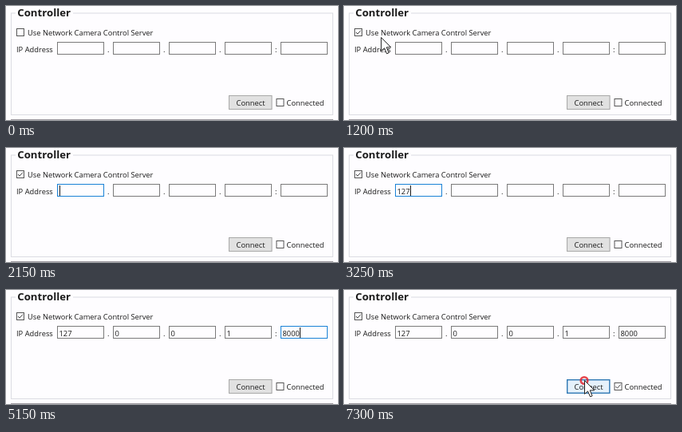
An HTML page with a canvas that plays this animation: 416 px wide and 143 px high, repeating every 7.35 s.

```html
<!DOCTYPE html>
<html lang="en">
<head>
<meta charset="utf-8">
<title>Controller</title>
<style>
  html, body { margin: 0; width: 100%; height: 100%; overflow: hidden; background: #fefdff; }
  canvas { display: block; width: 416px; height: 143px; }
</style>
</head>
<body>
<canvas id="stage"></canvas>
<script>
const WIDTH = 416, HEIGHT = 143, LOOP = 7350, STEP = 50;
const PAPER = '#fefdff', INK = '#1a1a1a';
const canvas = document.getElementById('stage');
const ctx = canvas.getContext('2d');
const ratio = window.devicePixelRatio || 1;
canvas.width = WIDTH * ratio;
canvas.height = HEIGHT * ratio;

const fieldX = [64, 134, 204, 274, 344];

// Each entry: time, field index, text from then on
const typing = [
  [2350, 0, '1'], [3100, 0, '12'], [3250, 0, '127'],
  [3750, 1, '0'], [4000, 2, '0'], [4350, 3, '1'],
  [4750, 4, '8'], [4850, 4, '80'], [5000, 4, '800'], [5150, 4, '8000']
];
const focusTimes = [[1650, 0], [3600, 1], [3850, 2], [4150, 3], [4550, 4], [6150, -1]];

// Pointer visits: time, x, y
const visits = [
  [[100, 35, 72], [400, 27, 9], [650, 20, 32], [850, 20, 33], [1000, 22, 34],
   [1450, 81, 47], [1650, 83, 48], [1750, 90, 52], [2150, 336, 146]],
  [[5750, 254, 144], [6100, 297, 122], [7250, 297, 122], [7300, 301.5, 113.5], [7350, 301.5, 113.5]]
];
const presses = [[700, 850], [1500, 1550], [6100, 6200], [7300, 7400]];

function pointerAt(t) {
  const path = visits.find(v => t >= v[0][0] && t <= v[v.length - 1][0]);
  if (!path) return null;
  const i = Math.max(1, path.findIndex(p => p[0] >= t));
  const [t0, x0, y0] = path[i - 1], [t1, x1, y1] = path[i];
  const u = (t - t0) / (t1 - t0), e = u * u * (3 - 2 * u);
  return { x: x0 + (x1 - x0) * e, y: y0 + (y1 - y0) * e };
}

function box(x, y, w, h, stroke, fill = PAPER, line = 1) {
  ctx.fillStyle = fill;
  ctx.fillRect(x, y, w, h);
  ctx.strokeStyle = stroke;
  ctx.lineWidth = line;
  ctx.strokeRect(x + line / 2, y + line / 2, w - line, h - line);
}

function text(s, x, y, font = '9.35px') {
  ctx.font = font + ' "Open Sans", "Noto Sans", sans-serif';
  ctx.fillStyle = INK;
  ctx.fillText(s, x, y);
}

function polyline(points, color, width) {
  ctx.beginPath();
  points.forEach(([x, y]) => ctx.lineTo(x, y));
  ctx.strokeStyle = color;
  ctx.lineWidth = width;
  ctx.stroke();
}

function checkbox(x, y, checked) {
  box(x, y, 10, 10, '#555');
  if (checked) polyline([[x + 2, y + 5], [x + 4, y + 7.2], [x + 8, y + 2.6]], '#444', 1);
}

function drawFields(t, pointer) {
  const focus = (focusTimes.filter(f => f[0] <= t).pop() || [0, -1])[1];
  fieldX.forEach((x, i) => {
    const hover = pointer && pointer.x > x && pointer.x < x + 59 && pointer.y > 45 && pointer.y < 61;
    const border = hover ? '#171717' : focus === i ? '#1a82d6' : '#7a7a7a';
    box(x, 45, 59, 16, border);
    const value = (typing.filter(k => k[0] <= t && k[1] === i).pop() || [0, 0, ''])[2];
    text(value, x + 2.5, 57.7);
    const blinkOff = t >= 2950 && t < 3050;
    if (focus === i && !blinkOff) {
      ctx.fillRect(Math.round(x + 2.5 + ctx.measureText(value).width), 47, 1, 13);
    }
    if (i < 4) text(i < 3 ? '.' : ':', x + 63, 57.7);
  });
}

function drawButton(t, pointer) {
  const hover = pointer && pointer.x > 279 && pointer.x < 334 && pointer.y > 112 && pointer.y < 131;
  const pressed = t >= 6100 && t < 6300;
  const active = t >= 6100;
  box(279, 112, 54.5, 18, active || hover ? '#2f78b4' : '#a8a8a8',
    pressed ? '#d6e4f0' : hover ? '#e5f1fb' : '#e1e1e1', active ? 1.4 : 1);
  text('Connect', 288.5, 125);
}

function drawRing(t, x, y) {
  for (const [down, up] of presses) {
    const age = t - up;
    if (t < down || age >= 250) continue;
    const released = age >= 0;
    ctx.globalAlpha = released ? Math.min(0.6, (250 - age) / 220) : 0.85;
    ctx.strokeStyle = released ? '#35a9e6' : '#e3262e';
    ctx.lineWidth = released ? 3.8 : 2.6;
    ctx.beginPath();
    ctx.arc(x, y, released ? 3.2 + age * 0.04 : 4.3, 0, Math.PI * 2);
    ctx.stroke();
    ctx.globalAlpha = 1;
  }
}

function drawArrow(x, y) {
  const shape = [[0, 0], [0, 17], [4, 13.4], [7, 20.4], [9.6, 19.3], [6.7, 12.4], [12.2, 12.4]];
  ctx.beginPath();
  shape.forEach(([dx, dy]) => ctx.lineTo(x + dx, y + dy));
  ctx.closePath();
  ctx.fillStyle = '#fff';
  ctx.fill();
  ctx.strokeStyle = '#222';
  ctx.lineWidth = 1;
  ctx.stroke();
}

function drawBeam(x, y) {
  for (const [color, width] of [['#fff', 3], ['#111', 1.5]]) {
    polyline([[x, y - 8.5], [x, y + 8.5]], color, width);
    for (const dy of [-8.5, 8.5]) polyline([[x - 4.5, y + dy], [x + 4.5, y + dy]], color, width);
  }
}

function drawPointer(t, pointer) {
  if (!pointer) return;
  const { x, y } = pointer;
  const beam = y > 45 && y < 61 && fieldX.some(left => x > left && x < left + 59);
  // The ring sits at the corner of the pointer image
  drawRing(t, beam ? x - 13 : x - 0.5, beam ? y - 14 : y);
  (beam ? drawBeam : drawArrow)(x, y);
}

function draw(t) {
  const pointer = pointerAt(t);
  ctx.setTransform(ratio, 0, 0, ratio, 0, 0);
  ctx.fillStyle = PAPER;
  ctx.fillRect(0, 0, WIDTH, HEIGHT);
  box(6, 8.5, 404, 128.5, '#dcdce2');
  ctx.fillStyle = PAPER;
  ctx.fillRect(12, 6, 72, 8);
  text('Controller', 14.3, 13.2, 'bold 13.2px');
  ctx.fillStyle = '#a09ca2';
  ctx.fillRect(6, 142, 404, 1);

  checkbox(13, 28, t >= 850);
  text('Use Network Camera Control Server', 27, 37);
  text('IP Address', 13, 57.7);
  drawFields(t, pointer);
  drawButton(t, pointer);
  checkbox(338.5, 116, t >= 6350);
  text('Connected', 351.5, 125.2);
  drawPointer(t, pointer);
}

function frame() {
  const t = performance.now() % LOOP;
  draw(Math.floor(t / STEP) * STEP);
  requestAnimationFrame(frame);
}
frame();
</script>
</body>
</html>
```
